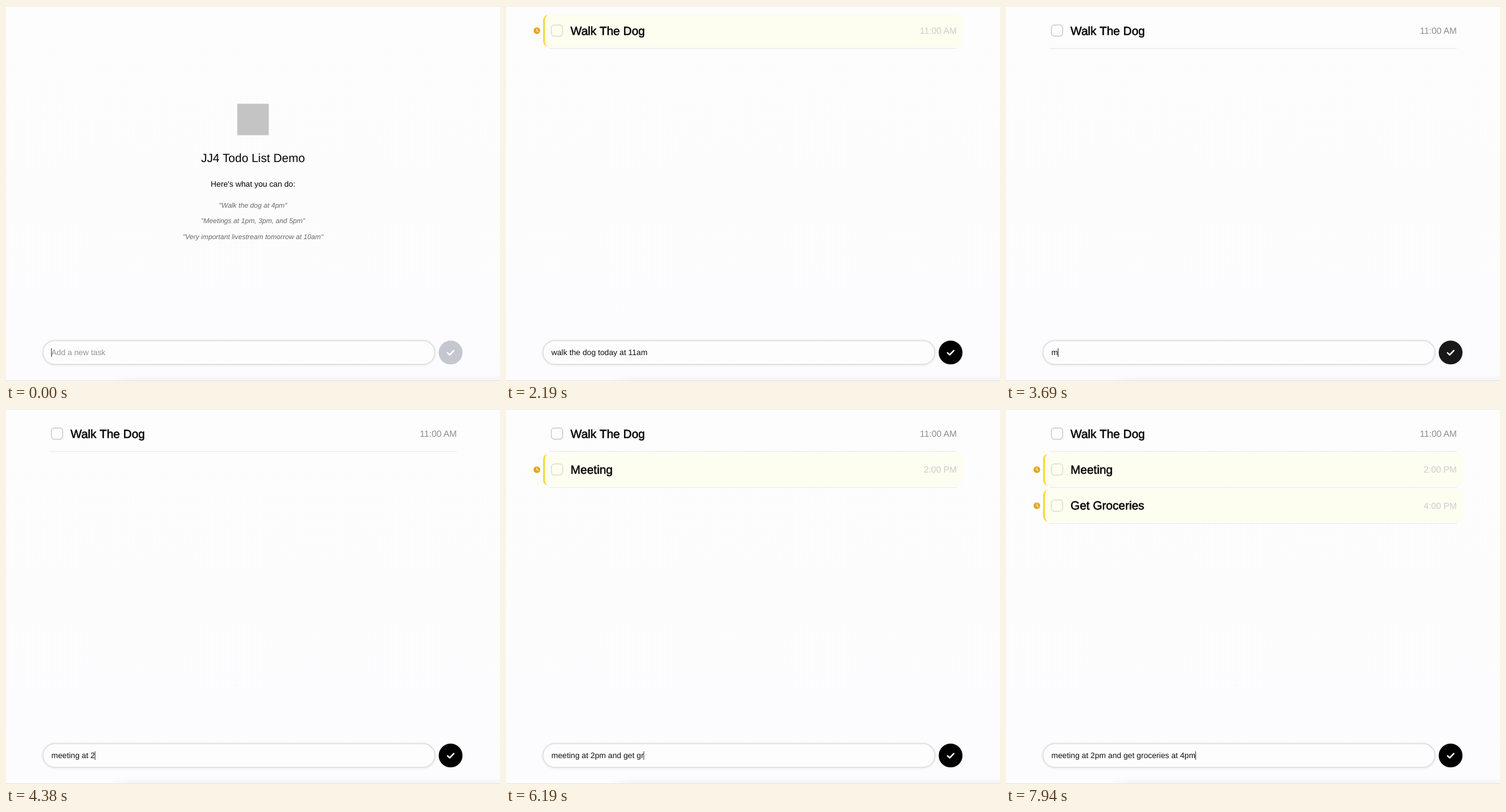
These frames come from a looping animation (800x608 px, 8 s). An HTML page:

```html
<!DOCTYPE html>
<html lang="en">
<head>
<meta charset="utf-8">
<title>Todo list</title>
<style>
  html, body { margin: 0; width: 100%; height: 100%; overflow: hidden; background: #fcfcfd; }
  svg { display: block; width: 800px; height: 608px; }
  text { font-family: Arial, "Liberation Sans", sans-serif; font-size: 12.8px; white-space: pre; text-rendering: geometricPrecision; }
  .mid { text-anchor: middle; }
  .hint { font-size: 11.2px; font-style: italic; fill: #67676b; }
  .name { font-size: 19.2px; stroke: #000; stroke-width: .5px; }
  .time { font-size: 14.4px; text-anchor: end; }
</style>
</head>
<body>
<svg id="stage" viewBox="0 0 800 608">
  <defs>
    <linearGradient id="page" x2="0" y2="1">
      <stop stop-color="#fdfdfd"/><stop offset="1" stop-color="#fcfcfe"/>
    </linearGradient>
    <linearGradient id="shade" x2="0" y2="1">
      <stop stop-color="#000" stop-opacity="0"/><stop offset="1" stop-color="#000" stop-opacity=".035"/>
    </linearGradient>
    <linearGradient id="side">
      <stop stop-color="#000"/><stop offset=".06" stop-color="#fff"/>
    </linearGradient>
    <mask id="fade"><rect x="165" y="596" width="635" height="12" fill="url(#side)"/></mask>
    <filter id="soft" x="-5%" y="-30%" width="110%" height="160%"><feGaussianBlur stdDeviation="1.4"/></filter>
  </defs>
  <rect width="800" height="608" fill="url(#page)"/>
  <rect width="800" height="1" fill="#ebebed"/>
  <rect x="165" y="598" width="635" height="10" fill="url(#shade)" mask="url(#fade)"/>
  <rect y="607" width="800" height="1" fill="#e4e4e6"/>

  <g id="welcome">
    <rect x="374.5" y="158.5" width="51" height="51" fill="#c4c4c4"/>
    <text class="mid" x="400" y="253.4" style="font-size:19.2px">JJ4 Todo List Demo</text>
    <text class="mid" x="400" y="293.2">Here's what you can do:</text>
    <text class="mid hint" x="400" y="326.5">"Walk the dog at 4pm"</text>
    <text class="mid hint" x="400" y="352.2">"Meetings at 1pm, 3pm, and 5pm"</text>
    <text class="mid hint" x="400" y="377.8">"Very important livestream tomorrow at 10am"</text>
  </g>

  <g id="list"></g>

  <rect x="60" y="543" width="634.5" height="38.5" rx="19.2" fill="none" stroke="#000" stroke-opacity=".12" stroke-width="2" filter="url(#soft)"/>
  <rect x="60" y="542.7" width="634.3" height="38.2" rx="19.1" fill="#fdfdfe" stroke="#d9dadd" stroke-width="1.2"/>
  <text id="hold" x="73.5" y="566.4" fill="#929296">Add a new task</text>
  <text id="typed" x="73.5" y="566.4" fill="#111"></text>
  <rect id="caret" y="555" width="1" height="14" fill="#333"/>
  <circle id="send" cx="720" cy="561.8" r="19.3"/>
  <path d="M715 562.2L718.5 565.6L725.2 558.6" fill="none" stroke="#fff" stroke-width="2.3" stroke-linecap="round" stroke-linejoin="round"/>
</svg>
<script>
const LOOP = 8000, FADE = 450;
const $ = id => document.getElementById(id);
const clamp = v => Math.min(1, Math.max(0, v));
const ease = v => 1 - (1 - clamp(v)) ** 3;
const mix = (a, b, k) => `rgb(${a.map((v, i) => Math.round(v + (b[i] - v) * k))})`;

// Each run types its text evenly between two times.
const runs = [
  ["walk the ", 60, 438],
  ["dog today at ", 625, 1375],
  ["11am", 1438, 1688],
  ["", 2750, 2750],
  ["m", 3560, 3560],
  ["eeting at ", 3750, 4312],
  ["2pm", 4375, 4500],
  [" and get gr", 5562, 6187],
  ["oc", 6250, 6375],
  ["eries at 4pm", 6437, 7125]
];
const keys = [{ t: 0, text: "" }];
for (const [text, from, to] of runs) {
  if (!text) keys.push({ t: from, text: "" });
  [...text].forEach((ch, i) => keys.push({
    t: from + (to - from) * i / Math.max(1, text.length - 1),
    text: keys[keys.length - 1].text + ch
  }));
}

const items = [
  { name: "Walk The Dog", time: "11:00 AM", from: 1940, done: 2750 },
  { name: "Meeting", time: "2:00 PM", from: 4810, done: Infinity },
  { name: "Get Groceries", time: "4:00 PM", from: 7375, done: Infinity }
];
$("list").innerHTML = items.map((it, i) => `
  <g transform="translate(0 ${i * 58.4})">
    <g class="mark">
      <rect x="60" y="14" width="680" height="52" rx="9" fill="#fdfdf0"/>
      <path d="M69 14A9 9 0 0 0 60 23V57A9 9 0 0 0 69 66A5.8 9 0 0 1 63.2 57V23A5.8 9 0 0 1 69 14Z" fill="#f6da3c"/>
      <circle cx="50" cy="40" r="5.4" fill="#e2a81a"/>
      <path d="M50 37V40.2L52 41.5" fill="none" stroke="#fff" stroke-width="1.1" stroke-linecap="round"/>
    </g>
    <rect x="70" y="68.3" width="660" height="1.2" fill="#e9e9ec"/>
    <rect class="box" x="73.5" y="30.7" width="18.2" height="18.2" rx="4.8" fill="none" stroke-width="1.5"/>
    <text class="name" x="104.5" y="46.6">${it.name}</text>
    <text class="time" x="730" y="45.1">${it.time}</text>
  </g>`).join("");
items.forEach((it, i) => {
  it.el = $("list").children[i];
  for (const part of ["mark", "box", "time"]) it[part] = it.el.querySelector("." + part);
});

function drawItem(it, t) {
  const kept = ease((t - it.done) / FADE);
  it.el.setAttribute("opacity", t < it.from ? 0 : .4 + .6 * ease((t - it.from) / 250));
  it.el.style.display = t < it.from ? "none" : "";
  it.mark.setAttribute("opacity", 1 - kept);
  it.box.setAttribute("stroke", mix([222, 221, 210], [203, 203, 208], kept));
  it.time.setAttribute("fill", mix([204, 204, 206], [141, 141, 146], kept));
}

function caretAlpha(age) {
  const p = age % 1200;
  return p < 600 ? 1 - clamp((p - 380) / 100) : clamp((p - 755) / 55);
}

function sendColor(t) {
  const on = t < 2750 ? ease((t - 60) / 260)
    : t < 3560 ? 1 - ease((t - 2750) / 260)
    : ease((t - 3560) / 260);
  return mix([196, 199, 207], [0, 0, 0], on);
}

function draw(t) {
  const key = keys.filter(k => k.t <= t).pop();
  const typed = $("typed");
  typed.textContent = key.text;
  $("hold").style.display = key.text ? "none" : "";
  const width = key.text ? typed.getComputedTextLength() : 0;
  $("caret").setAttribute("x", 73.2 + width);
  $("caret").setAttribute("opacity", caretAlpha(t - key.t));
  $("send").setAttribute("fill", sendColor(t));
  $("welcome").style.display = t < items[0].from ? "" : "none";
  items.forEach(it => drawItem(it, t));
}

const start = performance.now();
function tick() {
  draw((performance.now() - start) % LOOP);
  requestAnimationFrame(tick);
}
tick();
</script>
</body>
</html>
```
